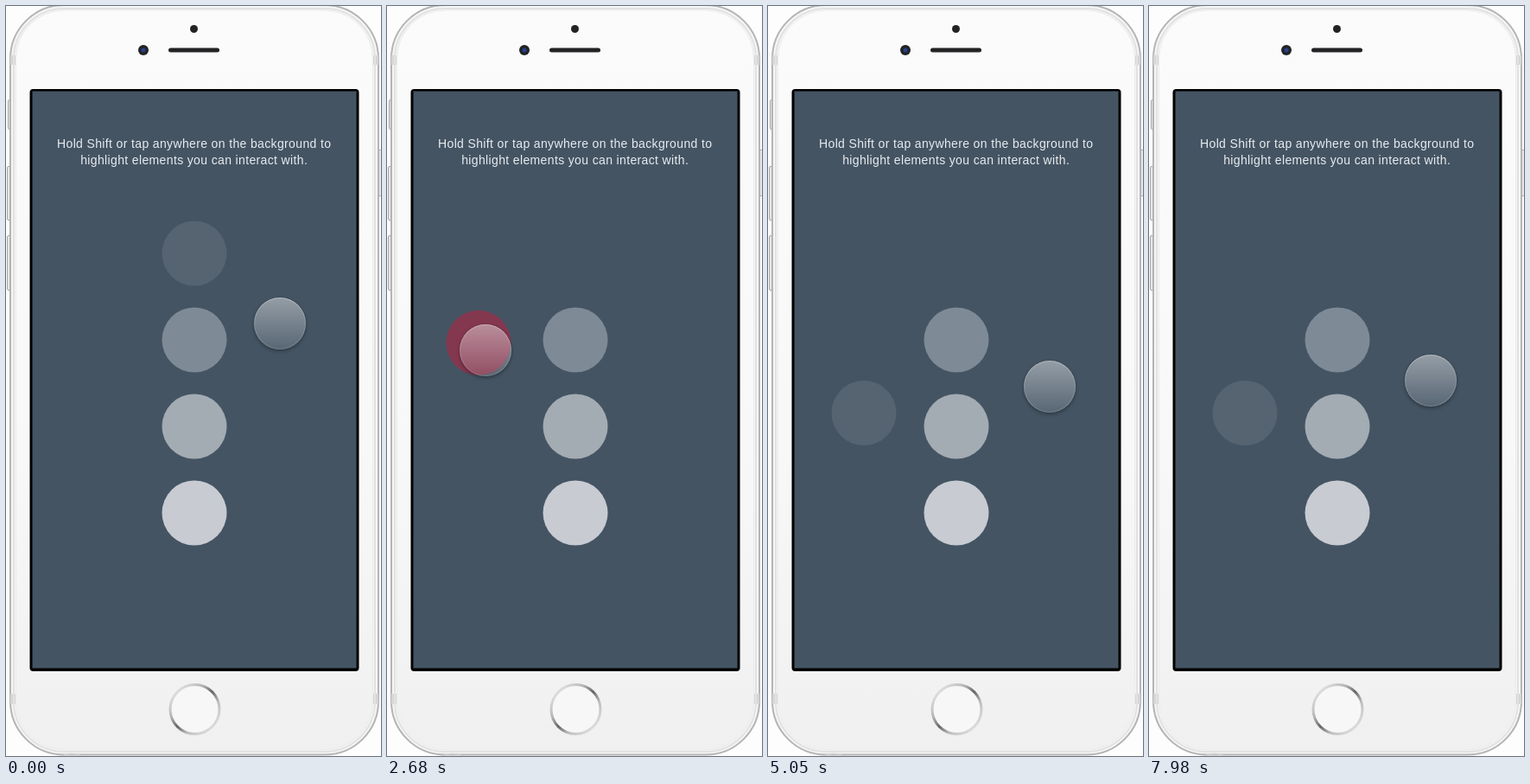
These frames come from a looping animation (434x867 px, 8000 ms). An HTML page:

```html
<!DOCTYPE html>
<html lang="en">
<head>
<meta charset="utf-8">
<title>Touch prototype</title>
<style>
  html, body { margin: 0; width: 100%; height: 100%; overflow: hidden; background: #fdfdfd; }
  svg { position: absolute; left: 0; top: 0; }
  text { font: 14px "Liberation Sans", Arial, sans-serif; letter-spacing: .36px; fill: #e9ecef; text-anchor: middle; }
  #cursor {
    position: absolute; left: -30px; top: -30px; width: 60px; height: 60px; border-radius: 50%;
    background: linear-gradient(rgba(255,255,255,.43), rgba(255,255,255,.11));
    box-shadow: 0 2px 4px rgba(0,0,0,.32), 0 0 2px rgba(0,0,0,.15),
      inset 0 0 0 1px rgba(255,255,255,.16), inset 0 1px 1px rgba(255,255,255,.15);
  }
</style>
</head>
<body>
<svg width="434" height="867" viewBox="0 0 434 867">
  <defs>
    <linearGradient id="body" x2="0" y2="1">
      <stop stop-color="#fbfbfb"/><stop offset=".6" stop-color="#f8f8f8"/><stop offset="1" stop-color="#f0f0f0"/>
    </linearGradient>
    <linearGradient id="ring" x1=".1" y1=".1" x2=".9" y2=".9">
      <stop stop-color="#e4e4e4"/><stop offset=".3" stop-color="#b5b5b5"/>
      <stop offset=".5" stop-color="#666"/><stop offset=".7" stop-color="#bdbdbd"/><stop offset="1" stop-color="#e0e0e0"/>
    </linearGradient>
  </defs>
  <!-- phone -->
  <g fill="#e6e6e6" stroke="#a5a5a5">
    <rect x="2.5" y="108.5" width="4" height="34" rx="1.5"/>
    <rect x="1.5" y="185.5" width="5" height="62" rx="1.5"/>
    <rect x="1.5" y="265.5" width="5" height="63" rx="1.5"/>
    <rect x="430" y="166.5" width="5" height="53" rx="1.5"/>
  </g>
  <rect x="5" y="-1" width="426" height="866.5" rx="62" fill="#f5f5f5" stroke="#b4b4b4" stroke-width="2"/>
  <g fill="#d6d6d6">
    <path d="M5 57h6v11h-6zM425 57h6v11h-6zM5 795h6v12h-6zM425 795h6v12h-6z"/>
  </g>
  <rect x="9" y="3" width="418" height="859" rx="58" fill="none" stroke="#e2e2e2" stroke-width="2"/>
  <rect x="11.5" y="5" width="413" height="855" rx="56" fill="url(#body)" stroke="#ebebeb"/>
  <path d="M62 868Q76 861 90 868" fill="none" stroke="#d0d0d0" stroke-width="1.5"/>
  <circle cx="217.5" cy="26.5" r="4.5" fill="#232325"/>
  <circle cx="159" cy="51" r="6" fill="#222326"/>
  <circle cx="159" cy="51" r="2.5" fill="#27408c"/>
  <rect x="188" y="48.5" width="59" height="5" rx="2.5" fill="#232325"/>
  <circle cx="218.5" cy="813" r="28.5" fill="#f7f7f7" stroke="url(#ring)" stroke-width="3"/>
  <!-- screen -->
  <rect x="27.5" y="96" width="381" height="673" rx="4"/>
  <rect x="30.5" y="98.5" width="375" height="667" fill="#445463"/>
  <text x="217.7" y="164">Hold Shift or tap anywhere on the background to</text>
  <text x="217.7" y="183">highlight elements you can interact with.</text>
  <circle cx="218" cy="386" r="37.5" fill="#7e8a95"/>
  <circle id="button" cx="218" cy="486" r="37.5" fill="#a3abb3"/>
  <circle cx="218" cy="586" r="37.5" fill="#c8cbd2"/>
  <circle id="ball" r="37.5"/>
  <g id="hints">
    <circle id="outline" r="36.7" fill="none" stroke="#9013fe" stroke-width="1.5"/>
    <circle cx="218" cy="486" r="37.5" fill="#9013fe"/>
  </g>
</svg>
<div id="cursor"></div>
<script>
const LOOP = 8000;
const [button, ball, hints, outline, cursor] =
  ['button', 'ball', 'hints', 'outline', 'cursor'].map(id => document.getElementById(id));

const clamp = (v, a = 0, b = 1) => Math.min(b, Math.max(a, v));
const part = (t, a, b) => clamp((t - a) / (b - a));
const cubic = t => t < .5 ? 4 * t ** 3 : 1 - 4 * (1 - t) ** 3;
const smooth = t => t * t * (3 - 2 * t);
const mix = (a, b, k) => a.map((v, i) => v + (b[i] - v) * k);

// start, end, destination, easing, optional curve control point
const moves = [
  [1320, 1740, [226, 294.5], cubic],
  [1900, 2680, [114, 398], smooth, [101.5, 285.7]],
  [2690, 3140, [119, 479], cubic],
  [3390, 4070, [326, 440], cubic],
  [5410, 5890, [209, 492], cubic, [268, 528]],
  [7540, 7975, [326, 433], cubic]
];

function cursorAt(t) {
  let p = [317, 367];
  for (const [start, end, to, ease, control = mix(p, to, .5)] of moves) {
    const k = ease(part(t, start, end));
    p = mix(mix(p, control, k), mix(control, to, k), k);
  }
  return p;
}

// The pressed button shrinks, then springs back.
function buttonScale(t) {
  if (t < 6270) return 1 - .2 * part(t, 6150, 6270);
  const s = t - 6270;
  return 1 - .2 * Math.exp(-s / 130) * Math.cos(s / 95);
}

function flash(t, start) {
  return t < start ? 0 : .8 * (1 - part(t, start, start + 420)) ** 2;
}

function place(circle, [x, y]) {
  circle.setAttribute('cx', x);
  circle.setAttribute('cy', y);
}

function draw(now) {
  const t = now % LOOP;
  const [x, y] = cursorAt(t);
  cursor.style.transform = `translate(${x}px, ${y}px)`;

  // The dragged ball trails the finger slightly.
  const [bx, by] = cursorAt(clamp(t - 12, 1800, 3200));
  const center = [bx - 8, by - 8.5];
  place(ball, center);
  place(outline, center);
  const held = part(t, 1900, 2060) - part(t, 3420, 3620);
  ball.setAttribute('fill', `rgb(${mix([86, 100, 114], [132, 56, 80], held).map(Math.round)})`);

  button.setAttribute('r', 37.5 * buttonScale(t));
  hints.setAttribute('opacity', flash(t, 500) + flash(t, 4640));
}

const begin = performance.now();
function frame() {
  draw(performance.now() - begin);
  requestAnimationFrame(frame);
}
frame();
</script>
</body>
</html>
```
